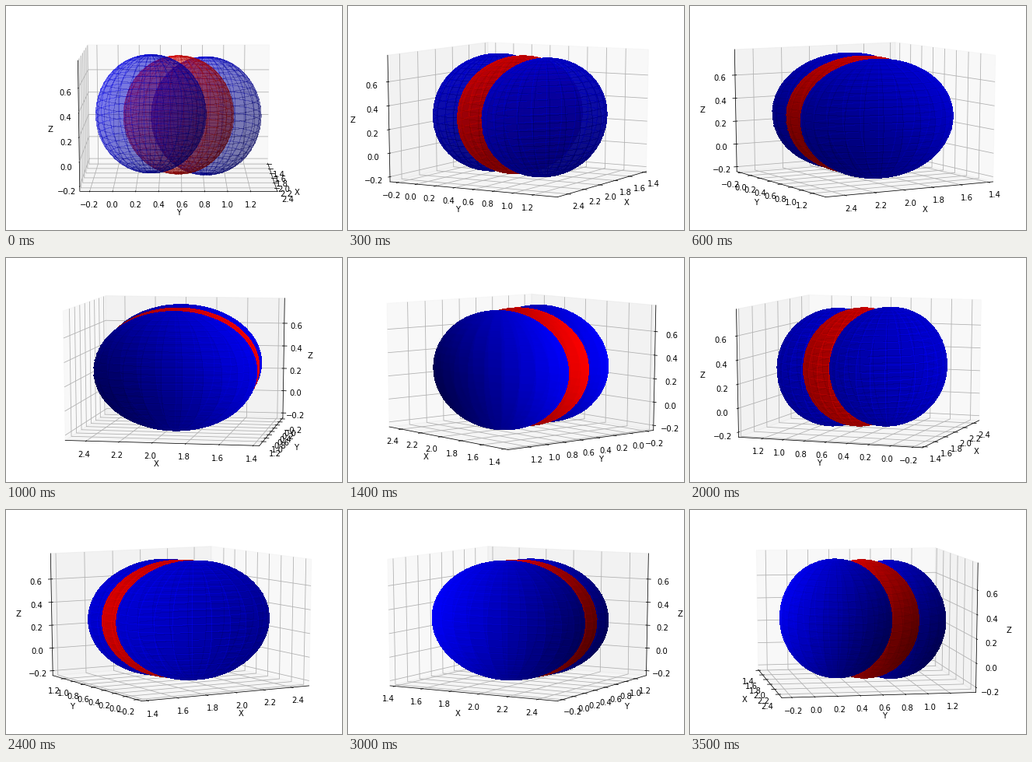
Write a matplotlib script that moves like this. It is 432x288 px and loops after 3600 ms.

```python
import matplotlib.pyplot as plt
import numpy as np
from matplotlib.animation import FuncAnimation
from matplotlib.collections import LineCollection, PolyCollection
from matplotlib.patches import Polygon

FRAMES = 36
ELEV = np.radians(10)
DIST = 10

# Scene in data units: three spheres of radius 0.5 in a row
RADIUS = 0.5
MIDDLE = np.array([1.946, 0.573, 0.2886])
STEP = np.array([-0.008, 0.25, -0.01])
SPAN = (2 * RADIUS + 2 * abs(STEP)) * (1.1, 1.1, 1)
COLORS = ((0, 0, 1), (1, 0, 0), (0, 0, 1))
ALPHA = 0.3
MAX_LAYERS = 8  # opaque from here on

# Axis box in units of the axis span
BOX = 0.5 + 1 / 48
DELTA = 1 / 12
PER_POINT = 48 / 720 * DELTA
TICK_PAD = 11.5 * PER_POINT
LABEL_PAD = 25 * PER_POINT
TICKS = (
    np.arange(7, 13) * 0.2,
    np.arange(-1, 7) * 0.2,
    np.arange(-1, 4) * 0.2,
)
PANE_GRAY = (0.95, 0.90, 0.925)


def project(p, azim):
    """Perspective view of box coordinates: plane position and depth."""
    x, y, z = np.moveaxis(np.asarray(p, float), -1, 0)
    c, s = np.cos(azim), np.sin(azim)
    near = x * c + y * s
    right = y * c - x * s
    up = z * np.cos(ELEV) - near * np.sin(ELEV)
    depth = DIST - near * np.cos(ELEV) - z * np.sin(ELEV)
    return np.stack([right, up], -1) / depth[..., None], depth


def sphere_patches():
    """Outlines of the patches of a unit sphere, 16 points each."""
    cuts = np.append(np.arange(0, 99, 4), 99) / 99
    patches = []
    for u0, u1 in zip(cuts, cuts[1:]):
        for v0, v1 in zip(cuts, cuts[1:]):
            t = np.arange(4) / 4
            o = np.zeros(4)
            a = np.concatenate([o, t, o + 1, 1 - t])
            b = np.concatenate([t, o + 1, 1 - t, o])
            u = 2 * np.pi * (u0 + (u1 - u0) * a)
            v = np.pi * (v0 + (v1 - v0) * b)
            patches.append(np.stack(
                [np.cos(u) * np.sin(v), np.sin(u) * np.sin(v), np.cos(v)], -1))
    return np.array(patches)


def shading(patches):
    normal = np.cross(patches[:, 5] - patches[:, 0],
                      patches[:, 10] - patches[:, 5])
    normal /= np.linalg.norm(normal, axis=1, keepdims=True)
    light = np.array([-1, -1, 0.5]) / 1.5
    return 0.65 + 0.35 * normal @ light


class Axis:
    def __init__(self, ax, index):
        self.index = index
        self.side = 1 if index == 0 else 0
        self.ticks = (TICKS[index] - MIDDLE[index]) / SPAN[index]
        z = 1 + index
        gray = (PANE_GRAY[index],) * 3
        self.pane = ax.add_patch(Polygon(
            np.zeros((4, 2)), facecolor=gray, edgecolor=gray, alpha=0.5,
            zorder=0.1 * index))
        self.line, = ax.plot([], [], color="k", lw=0.75, zorder=z)
        self.grid = ax.add_collection(LineCollection(
            [], colors="#b0b0b0", linewidths=0.8, zorder=z + 0.2),
            autolim=False)
        self.marks = [ax.plot([], [], color="k", lw=0.8, zorder=z + 0.4)[0]
                      for _ in self.ticks]
        self.numbers = [
            ax.text(0, 0, f"{v:.1f}".replace("-", "\u2212"), ha="center",
                    va="top", zorder=z + 0.4)
            for v in TICKS[index] + 1e-9]
        self.name = ax.text(0, 0, "XYZ"[index], ha="center", va="center",
                            zorder=z + 0.3)

    def outward(self, p, pad):
        shift = np.sign(p) * pad
        shift[self.index] = 0
        return p + shift

    def update(self, azim, back):
        i, side = self.index, self.side
        j, k = (i + 1) % 3, (i + 2) % 3

        corners = np.zeros((4, 3))
        corners[:, i] = back[i]
        corners[:, j] = np.array([-1, 1, 1, -1]) * BOX
        corners[:, k] = np.array([-1, -1, 1, 1]) * BOX
        self.pane.set_xy(project(corners, azim)[0])

        edge = back.copy()
        edge[side] *= -1
        ends = np.array([edge, edge])
        ends[1, i] *= -1
        self.line.set_data(*project(ends, azim)[0].T)

        middle = edge.copy()
        middle[i] = 0
        self.name.set_position(
            project(self.outward(middle, LABEL_PAD), azim)[0])

        grid = []
        inward = np.sign(back[side]) * DELTA
        for t, mark, number in zip(self.ticks, self.marks, self.numbers):
            bend = np.array([back] * 3)
            bend[:, i] = t
            bend[0, j] *= -1
            bend[2, k] *= -1
            grid.append(project(bend, azim)[0])

            pos = edge.copy()
            pos[i] = t
            tick = np.array([pos, pos])
            tick[:, side] += np.array([0.1, -0.2]) * inward
            mark.set_data(*project(tick, azim)[0].T)
            number.set_position(
                project(self.outward(pos, TICK_PAD), azim)[0])
        self.grid.set_segments(grid)


class Sphere:
    def __init__(self, ax, offset, color):
        self.center = offset / SPAN
        self.points = (PATCHES * RADIUS + offset) / SPAN
        self.colors = np.full((len(PATCHES), 4), ALPHA)
        self.colors[:, :3] = SHADE[:, None] * np.array(color)
        self.faces = ax.add_collection(PolyCollection(
            [], edgecolors="none", linewidths=0, antialiaseds=False),
            autolim=False)

    def update(self, azim, layers):
        xy, depth = project(self.points, azim)
        order = np.argsort(-depth.mean(axis=1))
        self.faces.set_verts(xy[order])
        self.faces.set_facecolor(self.colors[order])
        # extra offsets repeat the whole surface
        self.faces.set_offsets(np.zeros((layers * len(order), 2)))
        self.faces.set_zorder(30 - project(self.center, azim)[1])


PATCHES = sphere_patches()
SHADE = shading(PATCHES)

fig = plt.figure(figsize=(6, 4), dpi=72, facecolor="white")
ax = fig.add_axes([0, 0, 1, 1])
ax.set_axis_off()
axes = [Axis(ax, i) for i in range(3)]
spheres = [Sphere(ax, n * STEP, c) for n, c in zip((-1, 0, 1), COLORS)]
ax.set_xlim(-0.095, 0.09)
ax.set_ylim(-0.095, 0.09)


def update(frame):
    azim = np.radians(10 * frame)
    back = np.where([np.cos(azim) < 0, np.sin(azim) < 0, False], BOX, -BOX)
    for axis in axes:
        axis.update(azim, back)
    # every turn step paints the translucent surfaces once more
    for sphere in spheres:
        sphere.update(azim, min(frame + 1, MAX_LAYERS))
    return []


anim = FuncAnimation(fig, update, frames=FRAMES, init_func=lambda: update(0),
                     interval=100, repeat=True, repeat_delay=0)
plt.show()
```
